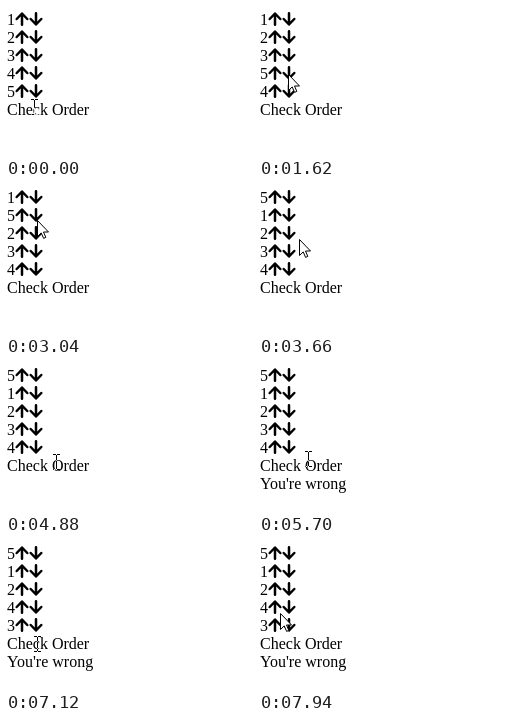
Animation of 247 by 150 pixels, one loop 8000 ms. Source, as an HTML page:

```html
<!DOCTYPE html>
<html lang="en">
<head>
<meta charset="utf-8">
<title>Order list</title>
<style>
  html, body { margin: 0; width: 100%; height: 100%; overflow: hidden; background: #fff; }
  svg { display: block; width: 247px; height: 150px; }
  text { font: 16px "Liberation Serif", "Times New Roman", serif; }
  .icon { fill: none; stroke: #000; stroke-width: 2.5; stroke-linecap: round; stroke-linejoin: round; }
  #beam { fill: none; stroke: #fff; mix-blend-mode: difference; }
</style>
</head>
<body>
<svg viewBox="0 0 247 150">
  <defs>
    <path id="up" class="icon" d="M1.7 8 7 2.5 12.3 8M7 3V13.7"/>
    <g id="down"><use href="#up" transform="matrix(1 0 0 -1 0 16)"/></g>
  </defs>
  <rect width="247" height="150" fill="#fff"/>
  <g id="rows"></g>
  <text x="1" y="109">Check Order</text>
  <text id="result" x="1" y="127">You're wrong</text>
  <path id="arrow" fill="#fff" stroke="#000" stroke-linejoin="miter"
        d="M.5 .5V16.5L4.2 12.9 6.6 18.4 8.8 17.4 6.5 12H11.5Z"/>
  <path id="beam" d="M-3-7.5H0M1-7.5H4M-3 7.5H0M1 7.5H4M.5-7V7"/>
</svg>
<script>
const LOOP = 8000;
const $ = id => document.getElementById(id);

// time, pointer x, y, shape
const pointer = [
  [0, 28, 101, "beam"], [200, 27, 97, "beam"], [400, 22, 82, "arrow"],
  [800, 27, 79, "arrow"], [1020, 32, 73, "arrow"], [1220, 29, 68, "arrow"],
  [2240, 32, 52, "arrow"], [2640, 31, 36, "arrow"],
  [3060, 31, 17, "arrow"], [3260, 30, 5, "arrow"],
  [3660, 40, 55, "arrow"], [3860, 41, 84, "arrow"], [4060, 45, 110, "beam"],
  [4680, 47, 104, "beam"], [4880, 50, 100, "beam"], [5280, 55, 105, "beam"],
  [5700, 49, 97, "beam"], [5900, 38, 83, "arrow"], [6100, 30, 70, "arrow"],
  [6500, 29, 72, "arrow"], [6700, 31, 78, "arrow"],
  [6920, 34, 110, "beam"], [7120, 31, 104, "beam"], [7320, 29, 100, "beam"],
  [7520, 26, 88, "arrow"], [7740, 19, 79, "arrow"], [7940, 21, 73, "arrow"]
];
const orders = [
  [0, "12345"], [1620, "12354"], [2440, "12534"],
  [2860, "15234"], [3460, "51234"], [6300, "51243"]
];
const RESULT_AT = 5080;

$("rows").innerHTML = [0, 1, 2, 3, 4].map(i => `
  <g transform="translate(0 ${i * 18})">
    <text x="1" y="19"></text>
    <use href="#up" x="9" y="5"/><use href="#down" x="23" y="5"/>
  </g>`).join("");
const digits = document.querySelectorAll("#rows text");

const at = (steps, t) => steps.findLast(step => step[0] <= t);

function draw(t) {
  const [, x, y, shape] = at(pointer, t);
  for (const id of ["arrow", "beam"]) {
    $(id).style.display = id === shape ? "" : "none";
    $(id).setAttribute("transform", `translate(${x} ${y})`);
  }
  const order = at(orders, t)[1];
  digits.forEach((digit, i) => {
    if (digit.textContent !== order[i]) digit.textContent = order[i];
  });
  $("result").style.display = t >= RESULT_AT ? "" : "none";
}

const start = performance.now();
function tick() {
  draw((performance.now() - start) % LOOP);
  requestAnimationFrame(tick);
}
tick();
</script>
</body>
</html>
```
